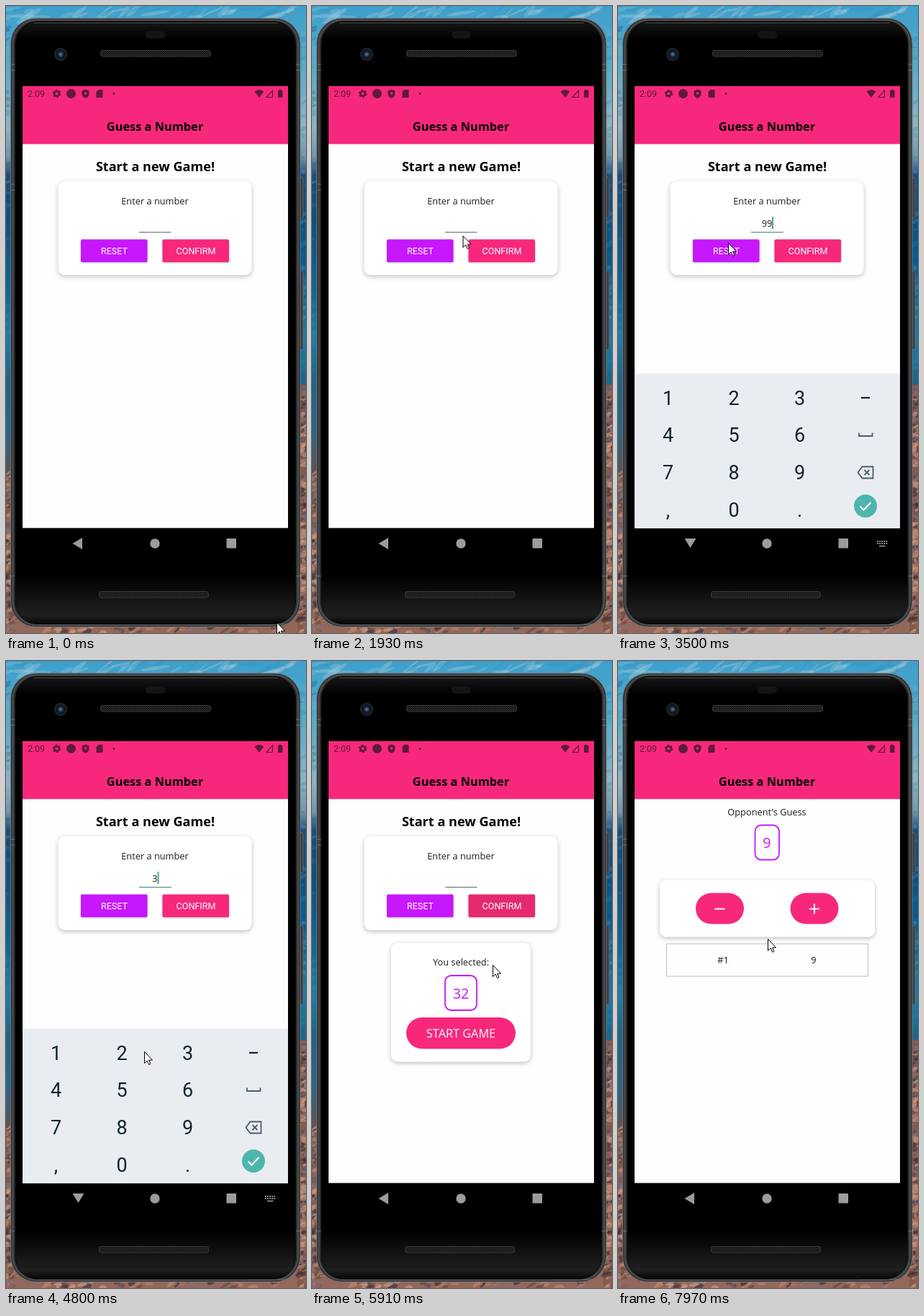
These frames come from a looping animation (417 by 869 pixels, 8 s). An HTML page with a canvas:

```html
<!DOCTYPE html>
<html lang="en">
<head>
<meta charset="utf-8">
<title>Guess a Number</title>
<style>
html, body { margin: 0; width: 100%; height: 100%; overflow: hidden; background: #176fa3; }
canvas, svg { position: absolute; left: 0; top: 0; width: 417px; height: 869px; }
text { font: 12.8px "Open Sans", sans-serif; fill: #1c1c1c; text-anchor: middle; white-space: pre; }
.head { font-weight: 700; fill: #000; }
.roboto { font: 12.56px Roboto, sans-serif; }
.white { fill: #fff; }
.big { font-size: 19.74px; fill: #c717fc; }
.card { fill: #fff; filter: drop-shadow(0 2px 3px rgba(0,0,0,.25)); }
.button { filter: drop-shadow(0 1px 1px rgba(0,0,0,.3)); }
.pink { fill: #f7287b; }
.frame { fill: none; stroke: #c717fc; stroke-width: 1.8; }
.status { fill: #5d1a3b; }
.nav { fill: #9c9c9c; }
#keys text { font: 27px Roboto, sans-serif; fill: #10242e; }
#caret { fill: #17897b; }
.timed { opacity: 0; }
</style>
</head>
<body>
<canvas id="scene" width="417" height="869"></canvas>
<svg viewBox="0 0 417 869">
  <defs>
    <linearGradient id="glass" x2="0" y2="1">
      <stop offset="0" stop-color="#171717"/><stop offset=".03" stop-color="#000"/>
      <stop offset=".92" stop-color="#000"/><stop offset=".985" stop-color="#202020"/>
      <stop offset="1" stop-color="#070707"/>
    </linearGradient>
    <radialGradient id="lens">
      <stop offset="0" stop-color="#6d8aa6"/><stop offset=".3" stop-color="#23384c"/>
      <stop offset=".6" stop-color="#0a1118"/><stop offset="1" stop-color="#2a2d30"/>
    </radialGradient>
    <pattern id="mesh" width="3" height="3" patternUnits="userSpaceOnUse">
      <rect width="3" height="3" fill="#2b2b2b"/><path d="M0 0l3 3M3 0L0 3" stroke="#101010" stroke-width=".8"/>
    </pattern>
    <clipPath id="screen"><rect x="23" y="111" width="369" height="612.5"/></clipPath>
  </defs>

  <!-- phone -->
  <g fill="#3c3e40" stroke="#737577" stroke-width=".7">
    <rect x="407" y="238" width="6" height="56" rx="1.5"/>
    <rect x="407" y="367" width="6" height="109" rx="1.5"/>
  </g>
  <rect x="6.5" y="17" width="402.5" height="843.5" rx="35" fill="#2d2f30" stroke="#737577"/>
  <rect x="9.5" y="19.5" width="396.5" height="838.5" rx="33" fill="none" stroke="#4c4f51" stroke-width="2"/>
  <path d="M7 81h6M7 89h6M403 81h6M403 89h6M7 247h6M7 255h6M7 790h6M403 790h6M335 857h54" stroke="#85878a" stroke-width=".7"/>
  <rect x="13" y="21.5" width="389.5" height="835" rx="31" fill="url(#glass)" stroke="#080808"/>
  <path d="M38 23.5H378" stroke="#555" stroke-width=".8"/>
  <rect x="194" y="35" width="27" height="10" rx="5" fill="#141414"/>
  <circle cx="76" cy="67" r="9" fill="url(#lens)"/>
  <g fill="url(#mesh)" stroke="#454545" stroke-width=".8">
    <rect x="131.5" y="61.5" width="153" height="8.5" rx="3"/>
    <rect x="129.5" y="811.5" width="152" height="8.5" rx="3"/>
  </g>

  <!-- app -->
  <g clip-path="url(#screen)">
    <rect x="23" y="111" width="369" height="613" fill="#fefefe"/>
    <rect x="23" y="111" width="369" height="80.4" class="pink"/>
    <g class="status">
      <text x="42" y="126" class="roboto status">2:09</text>
      <circle cx="70.5" cy="121.5" r="3.3" fill="none" stroke="#5d1a3b" stroke-width="2.4"/>
      <circle cx="70.5" cy="121.5" r="4.8" fill="none" stroke="#5d1a3b" stroke-width="2" stroke-dasharray="2.5 2.53"/>
      <circle cx="90.5" cy="121.5" r="6.5"/>
      <path d="M110.500 115.500l5 2v4q0 4-5 6.500q-5-2.500-5-6.500v-4z"/>
      <circle cx="110.5" cy="121" r="1.8" fill="#f7287b"/>
      <path d="M128.500 116h6v11h-9v-8z"/>
      <circle cx="150" cy="121.5" r="1.5"/>
      <path d="M345.500 118.500q6.500-5 13 0l-6.500 8.500z"/>
      <path d="M362 126.500h8.500V117z" fill="none" stroke="#5d1a3b" stroke-width="1.2"/>
      <path d="M378 117h1.500v-1.300h3V117H384.500v10H378z"/>
    </g>
    <text x="207" y="173" class="head" style="font-size:16.35px">Guess a Number</text>

    <g id="start">
      <text x="207.5" y="229" class="head" style="font-size:18.1px">Start a new Game!</text>
      <rect x="72.5" y="243" width="269" height="130" rx="9" class="card"/>
      <text x="207" y="274.5">Enter a number</text>
      <path d="M185 313.500h44.500" stroke="#666"/>
      <path id="focus" class="timed" d="M185 313.500h44.500" stroke="#487f73"/>
      <g id="values"></g>
      <rect id="caret" class="timed" x="-.7" y="292" width="1.5" height="17"/>
      <rect id="reset" x="104" y="323.5" width="92.5" height="31.5" rx="1.8" class="button" fill="#c717fc"/>
      <rect id="confirm" x="217.5" y="323.5" width="92.5" height="31.5" rx="1.8" class="button" fill="#f7287b"/>
      <text x="150.5" y="344" class="roboto white">RESET</text>
      <text x="264" y="344" class="roboto white">CONFIRM</text>
      <g id="summary" class="timed">
        <rect x="110" y="390.5" width="194" height="165" rx="9" class="card"/>
        <text x="207" y="422">You selected:</text>
        <rect x="185" y="436" width="44" height="48" rx="8.5" class="frame"/>
        <text x="207" y="468" class="big">32</text>
        <g id="play">
          <rect x="131" y="494" width="152" height="43.5" rx="21.7" class="pink"/>
          <text x="207" y="522" class="white" style="font-size:16.3px">START GAME</text>
        </g>
      </g>
    </g>

    <g id="game" class="timed">
      <text x="207" y="213.5">Opponent's Guess</text>
      <rect x="190.5" y="227.5" width="33.5" height="48" rx="8.5" class="frame"/>
      <text x="207" y="259" class="big">9</text>
      <rect x="58" y="303.5" width="299" height="79" rx="9" class="card"/>
      <rect x="108" y="321.5" width="67" height="43" rx="21.5" class="pink"/>
      <rect x="239.5" y="321.5" width="67" height="43" rx="21.5" class="pink"/>
      <path d="M134.500 343.500h14M266 343.500h14M273 336.500v14" stroke="#fff" stroke-width="2"/>
      <rect x="67.5" y="392" width="280" height="45" fill="#fefefe" stroke="#ccc" stroke-width="1.3"/>
      <text x="146" y="419">#1</text>
      <text x="272" y="419">9</text>
    </g>

    <g id="keyboard">
      <rect id="board" x="23" y="509.5" width="369" height="215" fill="#e9edf1"/>
      <g id="presses" fill="#d3d9dd"></g>
      <g id="keys"></g>
      <g fill="none" stroke="#4c5d66" stroke-width="1.8">
        <path d="M338 543h12" stroke="#10242e" stroke-width="2.2"/>
        <path d="M335 591.500v4.500h18.500v-4.500"/>
        <path d="M339.500 638.500h15v16h-15l-6-8zM342.500 643l7 7m0-7l-7 7"/>
      </g>
      <circle cx="344" cy="693" r="16" fill="#4db6ac"/>
      <path d="M336.500 693.500l5 5 10-10.500" fill="none" stroke="#fff" stroke-width="2.2"/>
    </g>
  </g>

  <!-- navigation -->
  <g class="nav">
    <path id="back" d="M92.500 745l13.500-8v16z"/>
    <g id="down" class="timed">
      <path d="M92.500 738h16l-8 13z"/>
      <path d="M360 742h14.500M360 745h14.500" stroke="#9c9c9c" stroke-width="1.8" stroke-dasharray="1.8 1.3"/>
      <path d="M363 748.500h8.500" stroke="#9c9c9c" stroke-width="1.5"/>
    </g>
    <circle cx="207" cy="745" r="6.7"/>
    <rect x="306.5" y="738" width="13.5" height="13.5" rx=".8"/>
  </g>

  <path id="pointer" d="M.5 .5V16.500L4.200 13 6.600 18.500 8.900 17.500 6.600 12.200H11.500Z" fill="#fff" stroke="#000" stroke-linejoin="round"/>
</svg>
<script>
const LOOP = 8000;
const $ = id => document.getElementById(id);

function add(parent, tag, attrs, content = '') {
  const node = document.createElementNS('http://www.w3.org/2000/svg', tag);
  for (const name in attrs) node.setAttribute(name, attrs[name]);
  node.textContent = content;
  return $(parent).appendChild(node);
}

// steps: [time in ms, style, easing until the next step], in strictly rising time
function play(node, steps, easing = 'ease-in-out') {
  const frames = steps.map(([time, style, ease]) => ({ ...style, offset: time / LOOP, easing: ease || easing }));
  const last = frames[frames.length - 1];
  if (frames[0].offset > 0) frames.unshift({ ...frames[0], offset: 0 });
  if (last.offset < 1) frames.push({ ...last, offset: 1 });
  node.animate(frames, { duration: LOOP, iterations: Infinity });
}

// Windows must begin after the loop's start and not touch each other.
function toggle(node, windows, inside = 1, outside = 0) {
  const steps = windows.flatMap(([from, to]) => [[from, { opacity: inside }], [to, { opacity: outside }]]);
  play(node, [[0, { opacity: outside }], ...steps], 'step-end');
}

function paintScene() {
  const ctx = $('scene').getContext('2d');
  let seed = 7;
  const random = () => (seed = seed * 16807 % 2147483647) / 2147483647;
  const sky = ctx.createLinearGradient(0, 0, 0, 869);
  [[0, '#3f9fcb'], [.1, '#55abc9'], [.19, '#8fb4c2'], [.24, '#6f98ad'], [.27, '#1a4f7c'], [.34, '#0e4f80'],
   [.45, '#0d669c'], [.53, '#1c7cac'], [.6, '#1c6589'], [.68, '#2a6685'], [.74, '#5b5354'], [.8, '#7f574c'], [1, '#94685a']]
    .forEach(stop => sky.addColorStop(...stop));
  ctx.fillStyle = sky;
  ctx.fillRect(0, 0, 417, 869);
  ctx.fillStyle = '#85594b';
  ctx.fillRect(405, 525, 12, 344);

  const blots = (count, place, colors, alpha, stretch) => {
    ctx.globalAlpha = alpha;
    for (let i = 0; i < count; i++) {
      const [x, y] = place();
      ctx.fillStyle = colors[Math.floor(random() * colors.length)];
      ctx.beginPath();
      ctx.ellipse(x, y, (2 + random() * 5) * stretch, 1 + random() * 3, -random() * .8, 0, 7);
      ctx.fill();
    }
  };
  const rocks = ['#332a30', '#c9886c', '#a0654f', '#5d4140', '#d3a088', '#857078'];
  blots(40, () => [random() * 417, random() * 18], ['#9ccbdb', '#2f8fc0', '#c3d9df'], .3, 3);
  blots(70, () => [random() < .5 ? 2 : 413, 20 + random() * 490], ['#7cb4cc', '#0c4f80', '#2587b8'], .25, 1);
  blots(150, () => [random() * 10, 645 + random() * 224], rocks, .6, 1);
  blots(220, () => [407 + random() * 10, 530 + random() * 339], rocks, .6, 1);
  blots(160, () => [random() * 417, 840 + random() * 29], rocks, .6, 1.5);
}

function buildKeyboard() {
  ['123', '456', '789', ',0.'].forEach((row, r) => [...row].forEach((key, c) =>
    add('keys', 'text', { x: 69.5 + c * 91.5, y: 552.5 + r * 51.8 }, key)));
  const press = (col, row, ...windows) => toggle(add('presses', 'rect',
    { x: 23 + col * 91.7, y: 517 + row * 51.5, width: 91.7, height: 51.5, class: 'timed' }), windows);
  press(2, 2, [2850, 2950], [3070, 3160]);
  press(2, 0, [4500, 4600]);
  press(1, 0, [5020, 5120]);
}

function movePointer() {
  const path = [[40, 376, 854], [840, 200, 297], [960, 200, 297], [1320, 265, 485], [1710, 266, 486],
    [2010, 200, 290], [2120, 200, 290], [2510, 230, 604], [2750, 258, 645], [3140, 258, 645],
    [3350, 161, 346], [3500, 153, 328], [3720, 153, 328], [4300, 256, 556], [4570, 256, 556],
    [4800, 192, 541], [4950, 165, 548], [5120, 165, 548], [5390, 270, 338], [5540, 270, 338],
    [5910, 251, 421], [6340, 240, 520], [6480, 240, 520], [6900, 341, 562], [7380, 341, 562],
    [7870, 201, 388], [7970, 208, 385]];
  play($('pointer'), path.map(([time, x, y]) => [time, { transform: `translate(${x}px, ${y}px)` }]));
}

function runApp() {
  const open = [[1020, 1620], [2130, 5470]];
  const away = { transform: 'translateY(216px)' }, home = { transform: 'translateY(0px)' };
  play($('keyboard'), [[0, away], ...open.flatMap(([from, to]) =>
    [[from, away, 'ease-out'], [from + 190, home], [to, home, 'ease-in'], [to + 130, away]])]);
  play($('board'), [[0, { fill: '#ebeeee' }], [1900, { fill: '#e9edf1' }]], 'step-end');
  toggle($('down'), open);
  toggle($('back'), open, 0, 1);
  toggle($('focus'), [[960, 1620], [2080, 5450]]);

  [['9', 2880, 3100], ['99', 3100, 3680], ['3', 4520, 5050], ['32', 5050, 5450]].forEach(([value, from, to]) =>
    toggle(add('values', 'text', { x: 207, y: 306, class: 'timed' }, value), [[from, to]]));

  const blinks = [[960, 1460, 208], [2080, 2580, 208], [2880, 3090, 211.5], [3100, 3660, 215],
    [3680, 4180, 208], [4520, 5020, 211.5], [5050, 5450, 215]];
  play($('caret'), [[0, { transform: 'translateX(208px)', opacity: 0 }], ...blinks.flatMap(([from, to, x]) => {
    const transform = `translateX(${x}px)`;
    return [[from, { transform, opacity: 1 }], [to, { transform, opacity: 0 }]];
  })], 'step-end');

  const tint = (id, color, dark, from, hold, to) => play($(id), [[from, { fill: color }],
    [from + 60, { fill: dark }], [hold, { fill: dark }], [to, { fill: color }]], 'linear');
  tint('reset', '#c717fc', '#b31be2', 3640, 3780, 3980);
  tint('confirm', '#f7287b', '#e52a70', 5410, 5930, 6110);

  toggle($('summary'), [[5490, 6520]]);
  play($('play'), [[6370, { opacity: 1 }], [6410, { opacity: .6 }], [6480, { opacity: .6 }], [6520, { opacity: 1 }]]);
  toggle($('start'), [[6520, LOOP]], 0, 1);
  toggle($('game'), [[6520, LOOP]]);
}

paintScene();
buildKeyboard();
movePointer();
runApp();
</script>
</body>
</html>
```
